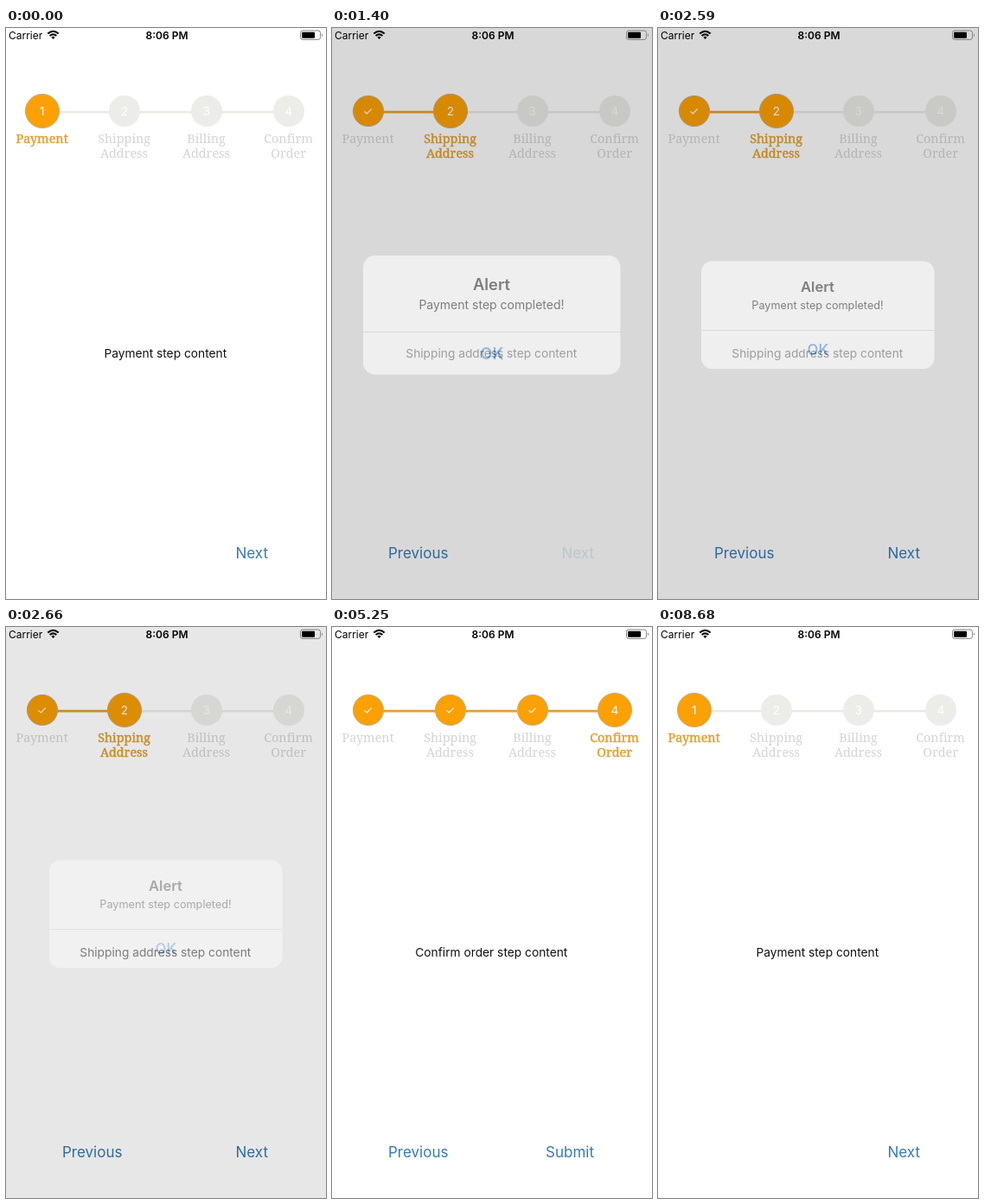
These frames come from a looping animation (370x660 px, 9030 ms). An HTML page:

```html
<!DOCTYPE html>
<html lang="en">
<head>
<meta charset="utf-8">
<title>Checkout stepper</title>
<style>
  html, body { margin: 0; width: 100%; height: 100%; overflow: hidden; background: #fff; }
  svg { display: block; width: 370px; height: 660px; font-family: Inter, "Open Sans", sans-serif; }
  text { text-anchor: middle; }
  .label { font: 14.4px "Noto Serif", serif; font-variant-ligatures: none; fill: #d4d4d2; }
  .label.on { fill: #e0a030; stroke: #e0a030; stroke-width: .45; }
  .num { font-size: 13.6px; fill: #fff; }
  .body { font-size: 13.75px; fill: #111; }
  .link { font-size: 17px; fill: #337ab7; }
  .start { text-anchor: start; }
  .end { text-anchor: end; }
  .disc { fill: #fba005; stroke: #c2b08a; stroke-width: 1; }
  .tick { fill: none; stroke: #fff; stroke-width: 1.1; }
</style>
</head>
<body>
<svg viewBox="0 0 370 660">
  <rect width="370" height="660" fill="#fff"/>
  <path d="M60 97.2H309" stroke="#e9e9e5" stroke-width="2.6"/>
  <g id="idle"></g>
  <text id="content" class="body" x="184.3" y="381"></text>
  <rect id="shade" width="370" height="660"/>
  <g id="vivid">
    <path id="bar" stroke="#e9a02a" stroke-width="2.8"/>
    <g id="steps"></g>
    <text id="prev" class="link start" x="65" y="613">Previous</text>
    <text id="next" class="link end" x="303" y="613"></text>
  </g>
  <g id="status">
    <text class="start" x="3" y="12.6" font-size="12">Carrier</text>
    <text x="186" y="12.6" font-size="12" font-weight="600">8:06 PM</text>
    <g fill="none" stroke="#000" stroke-width="2">
      <path d="M48.3 6.6Q54.5 .9 60.7 6.6M50.6 9.1Q54.5 5.6 58.4 9.1"/>
    </g>
    <path d="M52.4 10.7Q54.5 8.9 56.6 10.7L54.5 13Z"/>
    <rect x="340.5" y="3" width="23" height="10.4" rx="2.6" fill="none" stroke="#777" stroke-width=".9"/>
    <rect x="342.2" y="4.8" width="14.8" height="6.9" rx=".8"/>
    <path d="M365 6.4Q367 8.2 365 10Z" fill="#777"/>
  </g>
  <g id="alert">
    <rect x="50" y="269.5" width="269.5" height="124.5" rx="12.5" fill="#fff"/>
    <path d="M50 349.5H319.5" stroke="#dcdcde" stroke-width="1"/>
    <g id="message">
      <text x="184.5" y="305.5" font-size="16.6" font-weight="600">Alert</text>
      <text x="184.5" y="325.5" font-size="12.7">Payment step completed!</text>
      <text x="185" y="378" font-size="16.8" font-weight="600" fill="#3183d8">OK</text>
    </g>
  </g>
</svg>
<script>
const LOOP = 9030;
const TITLES = ["Payment", "Shipping Address", "Billing Address", "Confirm Order"];
const CONTENT = ["Payment", "Shipping address", "Billing address", "Confirm order"];
// [time, active step]
const CHANGES = [[-2000, 0], [1330, 1], [3570, 2], [4480, 3], [5390, 2], [6500, 1], [7490, 0]];
const BOUNCE = [[0, 18], [70, 20], [150, 22.3], [260, 19.6], [350, 20]];
const PRESS = [[-70, 1], [60, .16], [100, .18], [350, 1]];
const SHOW = 1290, HIDE = 2380, DIM = .36;

const $ = id => document.getElementById(id);
const centre = i => 42 + 95 * i;

function ramp(points, t) {
  if (t <= points[0][0]) return points[0][1];
  for (let i = 1; i < points.length; i++) {
    const [a, from] = points[i - 1], [b, to] = points[i];
    if (t < b) return from + (to - from) * (t - a) / (b - a);
  }
  return points[points.length - 1][1];
}

// Critically damped spring: distance left to travel
const spring = (t, k) => t <= 0 ? 1 : (1 + k * t) * Math.exp(-k * t);

function label(i, extra) {
  return TITLES[i].split(" ").map((word, row) =>
    `<text class="label ${extra}" x="${centre(i) - .4}" y="${133 + 17 * row}">${word}</text>`).join("");
}

const number = i => `<text class="num" x="${centre(i) - .2}" y="101">${i + 1}</text>`;

$("idle").innerHTML = TITLES.map((_, i) =>
  `<g><circle cx="${centre(i)}" cy="96" r="18" fill="#ecece8"/>${number(i)}${label(i, "")}</g>`).join("");
$("steps").innerHTML = TITLES.map((_, i) => {
  const x = centre(i);
  return `<g><circle class="disc" cx="${x}" cy="96"/>
    <path class="tick" d="M${x - 4.6} 96.3l2.9 2.7 5.5-5.6"/>
    <g>${number(i)}${label(i, "on")}</g></g>`;
}).join("");

const idle = [...$("idle").children];
const steps = [...$("steps").children];
const show = (node, on) => node.setAttribute("visibility", on ? "visible" : "hidden");

function drawSteps(active, age) {
  steps.forEach((step, i) => {
    const [disc, tick, current] = step.children;
    show(disc, i <= active);
    show(tick, i < active);
    show(current, i === active);
    disc.setAttribute("r", i === active ? ramp(BOUNCE, age) - .4 : 17.6);
    show(idle[i].children[1], i > active);
    for (const text of [...idle[i].children].slice(2)) show(text, i !== active);
  });
  $("bar").setAttribute("d", `M42 97.2H${centre(active)}`);
  $("content").textContent = CONTENT[active] + " step content";
  $("next").textContent = active === 3 ? "Submit" : "Next";
  show($("prev"), active > 0);
}

function drawButtons(t) {
  let next = 1, prev = 1;
  for (let i = 1; i < CHANGES.length; i++) {
    const fade = ramp(PRESS, t - CHANGES[i][0]);
    if (CHANGES[i][1] > CHANGES[i - 1][1]) next = Math.min(next, fade);
    else prev = Math.min(prev, fade);
  }
  $("next").setAttribute("opacity", next);
  $("prev").setAttribute("opacity", prev);
}

function drawAlert(t) {
  const left = spring(t - SHOW, .013);
  const level = t < HIDE ? 1 - left : t < 3010 ? spring(t - HIDE, .0093) : 0;
  const scale = 1 + .18 * left;
  $("shade").setAttribute("opacity", DIM * level);
  $("vivid").style.filter = level ? `brightness(${1 - .2 * level ** .4})` : "none";
  $("alert").setAttribute("opacity", level ** .6);
  $("message").setAttribute("opacity", level ** .35);
  $("alert").setAttribute("transform",
    `translate(184.75 331.75) scale(${scale}) translate(-184.75 -331.75)`);
}

function render(t) {
  const [start, active] = CHANGES.filter(c => c[0] <= t).pop();
  drawSteps(active, t - start);
  drawButtons(t);
  drawAlert(t);
}

const origin = performance.now();
function tick(now) {
  render(Math.max(0, now - origin) % LOOP);
  requestAnimationFrame(tick);
}
render(0);
requestAnimationFrame(tick);
</script>
</body>
</html>
```
